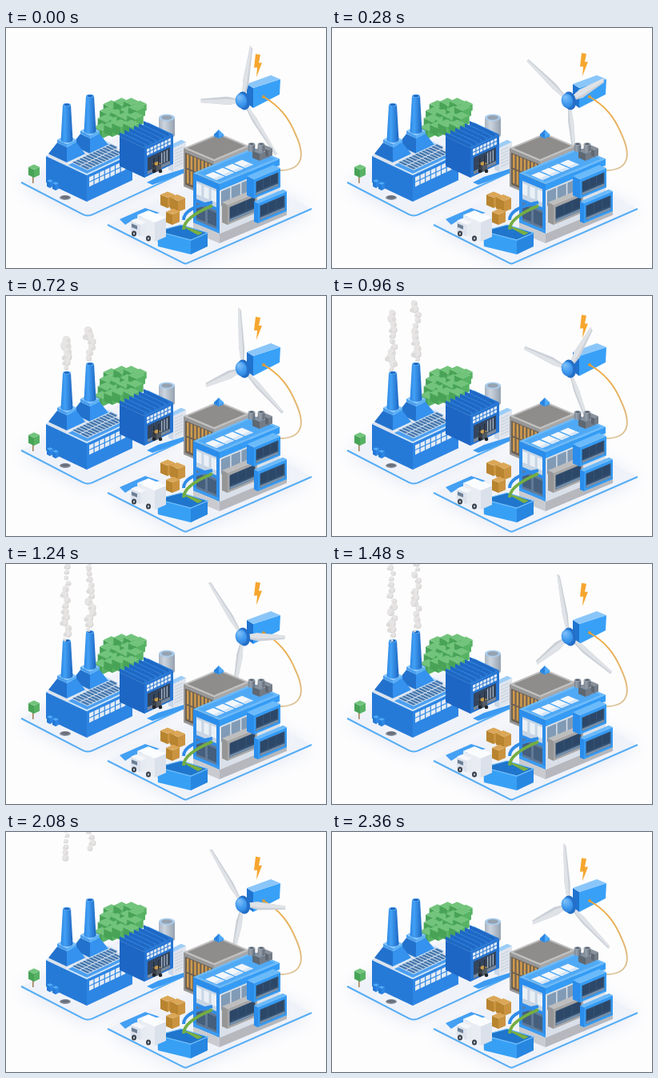
An HTML page with a canvas for the animation above (2.4 s loop, 400x300 px).

```html
<!DOCTYPE html>
<html lang="en">
<head>
<meta charset="utf-8">
<title>Smart factory</title>
<style>
html, body { margin: 0; width: 100%; height: 100%; overflow: hidden; background: #fff; }
canvas { display: block; }
</style>
</head>
<body>
<canvas id="stage" width="400" height="300"></canvas>
<script>
const LOOP = 2400, STEP = 40;
const view = document.getElementById('stage').getContext('2d');
const layer = document.createElement('canvas');
layer.width = 400;
layer.height = 300;
let ctx = layer.getContext('2d');
let slope = .47; // rise of the ground axes

// Each palette: top, left-facing side, right-facing side.
const BLUE = ['#52abf7', '#267ad7', '#2d86e4'];
const BRIGHT = ['#6bbafa', '#2b8deb', '#359cf5'];
const DEEP = ['#2f86e0', '#1d66c4', '#2675d2'];
const GREY = ['#bebebf', '#979696', '#a8a7a7'];
const DARK = ['#89919b', '#5f6872', '#737c87'];
const PALE = ['#f5f7fa', '#dce2ec', '#e6eaf1'];
const GREEN = ['#72c47c', '#48a357', '#57b264'];
const CARTON = ['#dba757', '#b8842f', '#ca9340'];

function poly(color, ...p) {
  ctx.fillStyle = color;
  ctx.beginPath();
  for (let i = 0; i < p.length; i += 2) ctx.lineTo(p[i], p[i + 1]);
  ctx.closePath();
  ctx.fill();
}

function rect(color, x, y, w, h) {
  ctx.fillStyle = color;
  ctx.fillRect(x, y, w, h);
}

function oval(color, x, y, rx, ry = rx, turn = 0) {
  ctx.fillStyle = color;
  ctx.beginPath();
  ctx.ellipse(x, y, rx, ry, turn, 0, Math.PI * 2);
  ctx.fill();
}

function panes(color, x, y, w, h, cols, rows, gap = 1) {
  for (let i = 0; i < cols * rows; i++)
    rect(color, x + (i % cols) * w / cols, y + Math.floor(i / cols) * h / rows,
      w / cols - gap, h / rows - gap);
}

// Drawing in the plane of a wall or roof.
function plane(a, b, c, d, x, y, paint) {
  ctx.save();
  ctx.transform(a, b, c, d, x, y);
  paint();
  ctx.restore();
}
const onLeft = (x, y, paint) => plane(1, slope, 0, 1, x, y, paint);
const onRight = (x, y, paint) => plane(1, -slope, 0, 1, x, y, paint);
const onTop = (x, y, paint) => plane(1, -slope, -1, -slope, x, y, paint);

// Block on its nearest bottom corner: a runs back left, b back right.
function block(x, y, a, b, h, [top, left, right]) {
  onLeft(x - a, y - h - a * slope, () => rect(left, 0, 0, a + .3, h));
  onRight(x, y - h, () => rect(right, 0, 0, b, h));
  onTop(x, y - h, () => rect(top, 0, 0, b, a));
}

function cylinder(x, top, bottom, r0, r1, light, mid, dark, rim) {
  const g = ctx.createLinearGradient(x - r1, 0, x + r1, 0);
  g.addColorStop(0, mid);
  g.addColorStop(.35, light);
  g.addColorStop(1, dark);
  oval(g, x, bottom, r1, r1 * .42);
  poly(g, x - r0, top, x + r0, top, x + r1, bottom, x - r1, bottom);
  oval(rim, x, top, r0, r0 * .42);
  oval(dark, x, top, r0 * .7, r0 * .28);
}

function noise(n) {
  const v = Math.sin(n * 127.1 + 11.7) * 43758.5453;
  return v - Math.floor(v);
}

// Ground slab whose two front edges are lined in blue.
function plate(lx, ly, fx, fy, rx, ry, round) {
  const front = new Path2D();
  front.moveTo(lx, ly);
  front.arcTo(fx, fy, rx, ry, round);
  front.lineTo(rx, ry);
  const slab = new Path2D(front);
  slab.lineTo(lx + rx - fx, ly + ry - fy);
  slab.closePath();
  ctx.save();
  ctx.shadowColor = 'rgba(90,115,180,.16)';
  ctx.shadowBlur = 22;
  ctx.shadowOffsetY = 3;
  ctx.fillStyle = '#eff2f9';
  ctx.fill(slab);
  ctx.restore();
  ctx.strokeStyle = '#55adf5';
  ctx.lineWidth = 2;
  ctx.stroke(front);
}

function chimney(x, top, base) {
  const wide = 23, slim = 12, foot = base + 19;
  block(x, foot + 4, wide, wide, 4, PALE);
  const side = (color, dir) => poly(color, x, base, x + dir * slim, base - slim * slope,
    x + dir * wide, foot - wide * slope, x, foot);
  side('#2272cd', -1);
  side('#3592ee', 1);
  block(x, base, slim, slim, 4, ['#8cc8fb', '#4a9fee', '#5bb0f8']);
  cylinder(x, top, base - 9, 5, 7.5, '#42a0f5', '#2d87e2', '#1c66c1', '#69b5f7');
}

function factory() {
  block(101, 217, 51, 57, 33, BLUE);
  onTop(101, 184, () => {
    rect('#cfe4f9', 0, 0, 57, 51);
    rect('#4b9ff0', 2, 2, 53, 47);
  });
  onRight(101, 184, () => panes('#e4ecf5', 3, 4, 53, 13, 8, 2, 1.2));
  chimney(105, 85, 138);
  chimney(76, 96, 149);
  onTop(101, 180, () => {
    rect('#d5e4f3', 3, 2, 50, 21);
    panes('#4878ad', 4, 3, 49, 20, 12, 2, 1.1);
  });
  for (let i = 0; i < 2; i++) block(55 + i * 7, 200 + i * 3, 4, 4, 7, BLUE);
  block(147, 157, 9, 4, 3, PALE);
  oval('#8b929e', 74, 212, 7, 3);
  oval('#6a717d', 74, 211.6, 5.5, 2.1);
}

function sawRoof(x, y, depth, teeth, pitch) {
  for (let i = teeth - 1; i >= 0; i--) {
    const u = x + i * pitch, v = y - i * pitch * slope;
    const back = depth * slope;
    poly('#1f68c3', u, v, u, v - 5, u - depth, v - 5 - back, u - depth, v - back);
    poly('#3288e2', u, v - 5, u + pitch, v - pitch * slope,
      u + pitch - depth, v - pitch * slope - back, u - depth, v - 5 - back);
    poly('#2675d2', u, v, u, v - 5, u + pitch, v - pitch * slope);
  }
}

function garage() {
  block(209, 180, 6, 16, 30, ['#9ccdf7', '#c9d7e8', '#e0e5ed']);
  onRight(209, 150, () => panes('#c5cdd8', 2, 4, 13, 24, 1, 6, 3));
  cylinder(201, 112, 134, 10, 10, '#ccd4de', '#aab4c1', '#96a2b0', '#a9cdee');
  block(173, 187, 31, 36, 37, DEEP);
  sawRoof(173, 150, 31, 6, 6);
  onRight(173, 150, () => {
    panes('#dfeaf5', 3, 3, 31, 9, 7, 2);
    rect('#34455e', 4, 14, 28, 21);
    rect('#78889c', 4, 31, 28, 4);
    panes('#a7b2c0', 21, 16, 10, 16, 3, 1, 2);
  });
  // forklift
  block(188, 180, 5, 6, 8, ['#c99b4b', '#3b414a', '#535a64']);
  onRight(184, 163, () => panes('#2a313b', 0, 0, 12, 16, 2, 1, 4.5));
  for (const x of [185, 193]) oval('#20262e', x, 179, 2.3);
}

function trees() {
  rect('#a5835c', 33, 183, 1.6, 11);
  block(35, 187, 7, 7, 10, GREEN);
  for (let i = 0; i < 16; i++) {
    const row = Math.floor(i / 4), size = 8 + noise(i) * 3;
    block(119 + (i % 4) * 12 + (3 - row) * 4 + noise(i + 40) * 3,
      108 + row * 9 + noise(i + 80) * 4 - (i % 4) * 1.5, size, size, size, GREEN);
  }
}

function greyBuilding() {
  block(260, 214, 38, 44, 48, GREY);
  onLeft(222, 150, () => {
    rect('#6b6054', 2, 5, 34, 40);
    panes('#cf9a4c', 4, 6, 32, 38, 7, 2, 2);
  });
  onTop(260, 166, () => rect('#8f8d8b', 2.5, 2.5, 39, 33));
  block(266, 138, 6, 6, 3, BRIGHT);
  poly('#2a83df', 260, 133, 266, 127, 266, 137);
  poly('#51a9f6', 266, 127, 272, 133, 266, 137);
}

// Box jutting out of the facade, glazed on its right-hand side.
function room(x, y, a, b, h, tone) {
  block(x, y, a, b, h, tone);
  onRight(x, y - h, () => {
    rect('#375374', 2.5, 4, b - 5, h - 7);
    rect('#7690ab', 2.5, h - 6, b - 5, 3);
    panes('#2c4767', 3, 5, b - 6, h - 12, 3, 1);
  });
}

function modernBuilding() {
  block(267, 269, 33, 84, 12, ['#e2e4e9', '#c9cbd0', '#b6b8bd']);
  onRight(267, 196, () => {
    rect('#d9e0e9', 0, 0, 75, 61);
    panes('#819bb6', 2, 9, 38, 20, 3, 1, 1.5);
  });
  onLeft(234, 182, () => {
    rect('#c7d5e4', 0, 0, 33, 31);
    rect('#607a96', 0, 31, 33, 30);
    panes('#eaf0f6', 4, 10, 28, 17, 3, 1, 3);
    panes('#455f7d', 4, 37, 28, 20, 2, 1, 3);
    rect('#2f8eea', 0, 30, 33, 4);
    for (const x of [0, 29]) rect('#2f8eea', x, 0, 4, 61);
    rect('#3b9bf2', 0, 57, 33, 4);
  });
  room(277, 246, 7, 37, 25, GREY);
  room(315, 244, 5, 36, 25, BRIGHT);
  block(267, 203, 33, 75, 8, BRIGHT);
  onTop(267, 195, () => {
    rect('#50a9f5', 3, 3, 69, 27);
    panes('#f3f7fb', 4, 8, 48, 16, 4, 1, 2);
    panes('#d4e5f6', 4, 8, 48, 6, 4, 1, 2);
  });
  room(310, 213, 9, 33, 24, BRIGHT);
  block(317, 166, 9, 16, 9, DARK);
  block(328, 161, 4, 5, 8, DARK);
  for (const x of [307, 319])
    cylinder(x, 145, 153, 4.3, 4.3, '#98a2ad', '#79838f', '#5c6673', '#aab2bc');
}

function conveyor() {
  ctx.lineWidth = 4;
  for (const [color, lift] of [['#2f8ce8', 12], ['#74ad43', 0]]) {
    ctx.strokeStyle = color;
    ctx.beginPath();
    ctx.moveTo(222, 252 - lift);
    ctx.quadraticCurveTo(222, 237 - lift, 258, 222 - lift / 3);
    ctx.stroke();
  }
}

function bin() {
  const rim = [189, 254, 219, 246, 252, 256, 231, 265];
  poly('#1f76cc', ...rim);
  poly('#7aae43', 222, 249, 228, 249, 246, 256, 240, 259);
  poly('#37a0f5', 189, 254, 231, 265, 231, 283, 190, 273);
  poly('#2786e0', 231, 265, 252, 256, 252, 273, 231, 283);
  ctx.strokeStyle = '#74bffa';
  ctx.lineWidth = 1.2;
  ctx.beginPath();
  for (let i = 0; i < rim.length; i += 2) ctx.lineTo(rim[i], rim[i + 1]);
  ctx.closePath();
  ctx.stroke();
}

function truck() {
  block(186, 267, 22, 14, 24, ['#fbfcfd', '#e9edf3', '#dbe1eb']);
  block(168, 260, 12, 7, 14, PALE);
  onLeft(156, 241, () => rect('#6b8097', 1, 3, 7, 4.5));
  for (let i = 0; i < 2; i++) {
    const x = 160 + i * 18, y = 257 + i * 6;
    oval('#3a4049', x, y, 3, 3.6);
    oval('#b5bbc4', x, y, 1.2, 1.5);
  }
}

function buildScene() {
  plate(19, 193, 102, 236, 227, 178, 14);
  poly('#3b9bf2', 176, 193, 190, 186, 222, 176, 225, 180, 197, 191, 183, 196);
  trees();
  factory();
  garage();
  slope = .42;
  plate(127, 246, 224, 295, 382, 226, 5);
  poly('#44a0f3', 142, 239, 174, 225, 192, 231, 160, 239, 149, 246);
  greyBuilding();
  modernBuilding();
  block(202, 225, 9, 9, 13, CARTON);
  block(215, 230, 10, 9, 14, CARTON);
  block(208, 246, 8, 9, 13, CARTON);
  bin();
  conveyor();
  truck();
}

function cable() {
  const g = ctx.createLinearGradient(0, 90, 0, 180);
  g.addColorStop(0, '#eda83f');
  g.addColorStop(1, '#dcc59d');
  ctx.strokeStyle = g;
  ctx.lineWidth = 2;
  ctx.beginPath();
  ctx.moveTo(322, 86);
  ctx.bezierCurveTo(341, 97, 353, 111, 362, 133);
  ctx.bezierCurveTo(375, 161, 370, 178, 342, 178);
  ctx.stroke();
  oval('#d99a38', 322, 86, 2);
}

function nacelle() {
  poly('#2073cf', 301, 70, 309, 75, 309, 100, 301, 94);
  poly('#38a0f7', 309, 75, 343, 64, 342, 83, 309, 100);
  poly('#8ac6f9', 301, 70, 331, 59, 343, 64, 309, 75);
  cable();
}

function bolt(t) {
  ctx.save();
  ctx.translate(314, 27.5 + 5 * Math.cos(t / LOOP * Math.PI * 2));
  poly('#f6a62f', -2, 0, 4, 1, 2, 11, 6, 11, -1, 29, 0, 17, -4, 17);
  ctx.restore();
}

function rotor(t) {
  const turn = 79.5 - 5.82 * t / STEP;
  for (let i = 0; i < 3; i++) {
    ctx.save();
    ctx.transform(56, 25.6, 0, -74.2, 296, 91);
    ctx.rotate((turn + i * 120) * Math.PI / 180);
    poly('#cbd0d7', .08, -.03, .35, -.07, .98, -.04, 1, .02, .35, .06, .08, .03);
    poly('#dfe2e6', .08, -.01, .35, -.03, .98, -.02, 1, .02, .35, .06, .08, .03);
    ctx.restore();
  }
  oval('#246fc8', 297, 91, 8, 11.5, -.2);
  const g = ctx.createRadialGradient(291, 86, 1, 295, 91, 11);
  g.addColorStop(0, '#7cbdf7');
  g.addColorStop(.55, '#3f9aef');
  g.addColorStop(1, '#2876d0');
  oval(g, 294, 91, 7.2, 9.3, -.2);
}

function smoke(t, x, y, seed) {
  for (let i = 0; i < 25; i++) {
    const age = t - 430 - i * 50;
    const py = y - age * .14;
    if (age < 0 || py < -12) continue;
    const n = seed + i * 3;
    const r = (4 + noise(n) * 2 + (i < 2 ? 1.5 : 0)) * Math.min(1, .3 + age / 110) * (1 - age / 1500);
    const px = x + (noise(n + 1) - .5) * 6;
    oval('#d3d1d1', px + .7, py + .8, r);
    oval('#e7e5e4', px, py, r * .9);
    oval('#dedcdb', px + Math.sign(noise(n + 2) - .5) * r * .7, py + 2, r * .55);
  }
}

function draw() {
  const now = performance.now() - start;
  const t = Math.floor((now % LOOP) / STEP) * STEP;
  rect('#fdfdfe', 0, 0, 400, 300);
  nacelle();
  bolt(t);
  rotor(t);
  ctx.drawImage(layer, 0, 0);
  smoke(t, 75, 95, 5);
  smoke(t, 105, 83, 140);
  requestAnimationFrame(draw);
}

buildScene();
ctx = view;
const start = performance.now();
draw();
</script>
</body>
</html>
```
